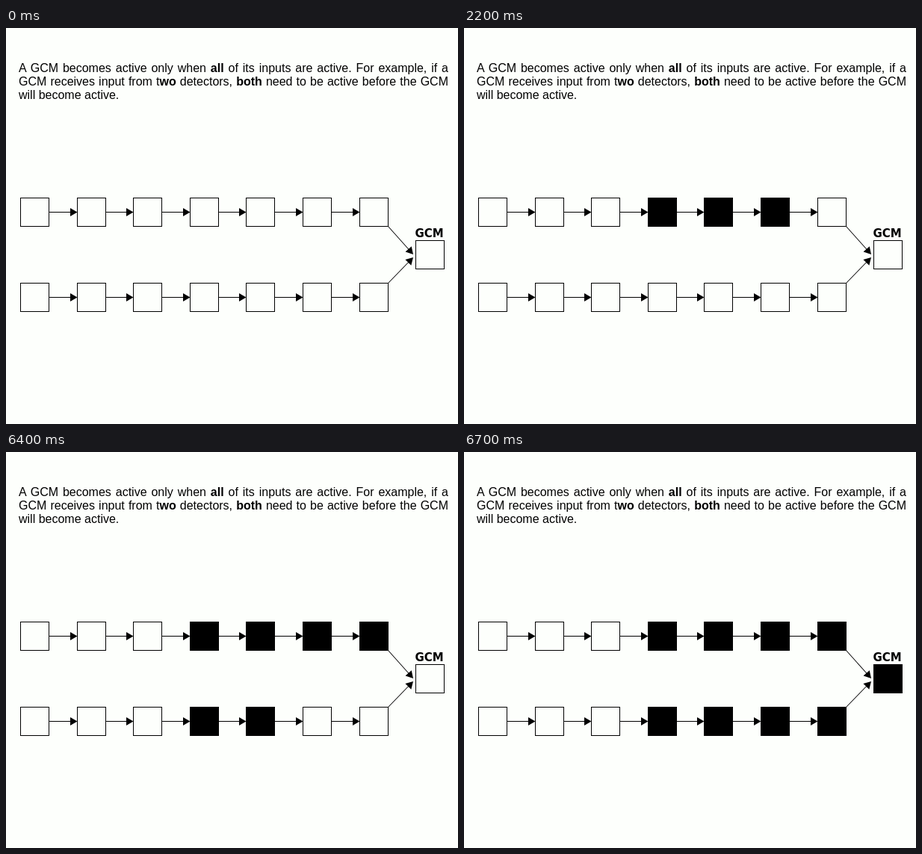
Recreate the animation shown at these times as an HTML page. Size 605 by 530 pixels, loop 6.8 s.

```html
<!DOCTYPE html>
<html lang="en">
<head>
<meta charset="utf-8">
<title>GCM activation</title>
<style>
  html, body { margin: 0; width: 100%; height: 100%; overflow: hidden; background: #fdfffc; }
  svg { position: absolute; left: 0; top: 0; }
  .note {
    position: absolute; left: 17px; top: 45px; width: 575px;
    font: 16px/18px "Liberation Sans", Arial, sans-serif; color: #000;
  }
  .note div { white-space: nowrap; text-align: justify; text-align-last: justify; }
  .note div:last-child { text-align-last: left; }
  .label { font: bold 15px "DejaVu Sans", sans-serif; }
  .box { fill: none; stroke: #000; }
  .fill { visibility: hidden; }
</style>
</head>
<body>
<div class="note">
  <div>A GCM becomes active only when <b>all</b> of its inputs are active. For example, if a</div>
  <div>GCM receives input from t<b>wo</b> detectors, <b>both</b> need to be active before the GCM</div>
  <div>will become active.</div>
</div>
<svg id="stage" width="605" height="530" viewBox="0 0 605 530">
  <text class="label" x="547.5" y="280">GCM</text>
</svg>
<script>
const LOOP = 6800, STEP = 100, SIZE = 38, PITCH = 75.6;
const stage = document.getElementById('stage');
const cells = [];

function add(name, attrs) {
  const node = document.createElementNS('http://www.w3.org/2000/svg', name);
  for (const key in attrs) node.setAttribute(key, attrs[key]);
  return stage.appendChild(node);
}

function box(x, y, activeAt) {
  if (activeAt !== undefined) {
    const node = add('rect', { x, y, width: SIZE, height: SIZE, class: 'fill' });
    cells.push({ node, activeAt });
  }
  add('rect', { x, y, width: SIZE, height: SIZE, class: 'box' });
}

function arrow(x1, y1, x2, y2) {
  const angle = Math.atan2(y2 - y1, x2 - x1) * 180 / Math.PI;
  const length = Math.hypot(x2 - x1, y2 - y1);
  add('path', {
    d: `M0 0H${length - 8}`, stroke: '#000',
    transform: `translate(${x1} ${y1}) rotate(${angle})`
  });
  add('path', {
    d: 'M0 0L-9.5 -5.5V5.5Z',
    transform: `translate(${x2} ${y2}) rotate(${angle})`
  });
}

function row(y, start) {
  for (let i = 0; i < 7; i++) {
    const x = Math.round(19 + i * PITCH) + 0.5;
    box(x, y, i < 3 ? undefined : start + (i - 3) * STEP);
    if (i < 6) arrow(x + SIZE, y + 19, Math.round(19 + (i + 1) * PITCH) + 0.5, y + 19);
  }
}

row(227.5, 2000);
row(341.5, 6300);
box(548.5, 284.5, 6700);
arrow(511.5, 265.5, 545, 303);
arrow(511.5, 341.5, 545, 307);

const origin = performance.now();
function draw() {
  const time = (performance.now() - origin) % LOOP;
  for (const { node, activeAt } of cells)
    node.style.visibility = time >= activeAt ? 'visible' : 'hidden';
  requestAnimationFrame(draw);
}
draw();
</script>
</body>
</html>
```
